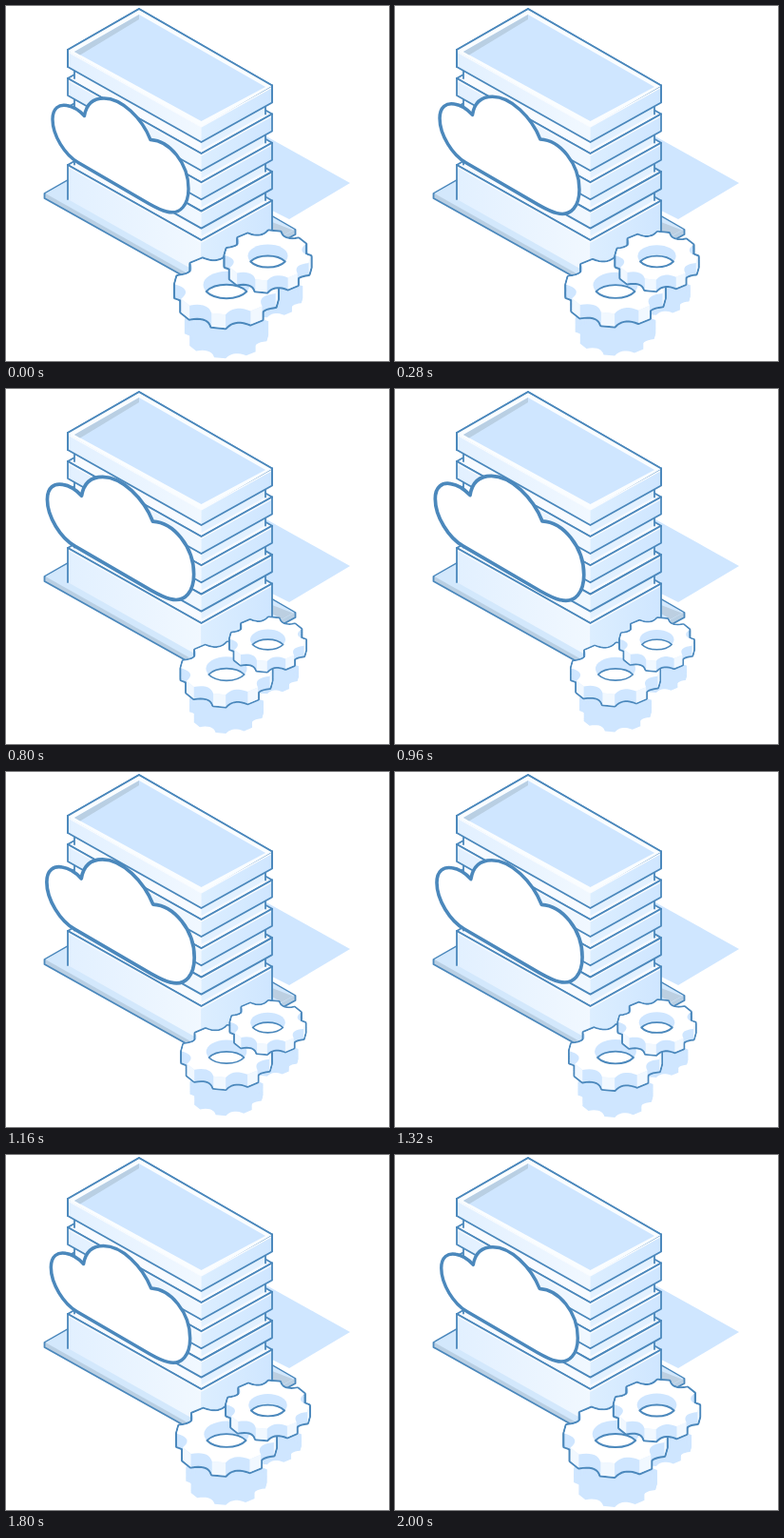
An HTML page for the animation above (2.04 s loop, 403 by 373 pixels).

```html
<!DOCTYPE html>
<html lang="en">
<head>
<meta charset="utf-8">
<title>Cloud server</title>
<style>
  html, body { margin: 0; width: 100%; height: 100%; overflow: hidden; background: #fff; }
  svg { display: block; width: 403px; height: 373px; }
</style>
</head>
<body>
<svg id="stage" viewBox="0 0 403 373" stroke-linejoin="round" stroke-linecap="round">
  <defs>
    <linearGradient id="leftFace"><stop stop-color="#e2f0ff"/><stop offset="1" stop-color="#f1f8ff"/></linearGradient>
    <linearGradient id="rightFace"><stop stop-color="#dceeff"/><stop offset="1" stop-color="#cfe6ff"/></linearGradient>
  </defs>
  <g id="building"></g>
  <g id="cloud">
    <path fill="#fff" stroke="#4b88bc" stroke-width="3.4" d="M82.500 115.500C84.500 103 92 97 103 97C122 97 143 118 152 140.500C172 141.500 192 165 192 192C192 208 184 220 169 216C164 215 158 212 150 207.500L76 164.500C62 156.500 49 136 49 119C49 107 56 103 64 104.500C71 105.500 77 109.500 82.500 115.500Z"/>
  </g>
  <g id="shadows"></g>
  <g id="gears"></g>
</svg>
<script>
const LINE = '#4b88bc', BLUE = '#cfe6ff', PERIOD = 2040, STEP = 40;
const $ = id => document.getElementById(id);

function add(parent, tag, attrs) {
  const node = document.createElementNS('http://www.w3.org/2000/svg', tag);
  for (const key in attrs) node.setAttribute(key, attrs[key]);
  return parent.appendChild(node);
}
const shape = (parent, d, fill, stroke = 'none', width = 1.8) =>
  add(parent, 'path', { d, fill, stroke, 'stroke-width': width });

// Two visible faces of an isometric block; y is the height of its left top corner.
function faces(y, height, inset, leftFill, rightFill) {
  const g = $('building');
  const left = 65 + inset, right = 280 - inset;
  const front = y + 79 - inset * 0.56, rightY = y + 37.5;
  shape(g, `M${left} ${y}L205.500 ${front}v${height}L${left} ${y + height}Z`, leftFill);
  shape(g, `M205.500 ${front}L${right} ${rightY}v${height}L205.500 ${front + height}Z`, rightFill);
  return { left, right, front, rightY };
}

function slab(y, height, closed = true) {
  const g = $('building');
  shape(g, `M65 ${y}L140 ${y - 43}L280 ${y + 37.5}L205.500 ${y + 79}Z`, '#f8fbff', LINE);
  const { front, rightY } = faces(y, height, 0, 'url(#leftFace)', 'url(#rightFace)');
  shape(g, `M65 ${y + 1.7}L205.500 ${front + 1.7}L280 ${rightY + 1.7}`, 'none', '#f8fbff', 1.6);
  const bottom = closed ? `L205.500 ${front + height}L280 ${rightY + height}` : `M280 ${rightY + height}`;
  shape(g, `M65 ${y}v${height}${bottom}V${rightY}`, 'none', LINE);
  shape(g, `M65 ${y}L205.500 ${front}L280 ${rightY}`, 'none', LINE);
}

function neck(y) {
  const height = 13;
  const { left, right, rightY } = faces(y, height, 7, '#f8fbff', '#e3f1ff');
  shape($('building'), `M${left} ${y}v${height}M${right} ${rightY}v${height}`, 'none', LINE);
}

function buildBuilding() {
  const g = $('building');
  shape(g, 'M274 137L362 186L298 224L274 212Z', BLUE);
  shape(g, 'M40.500 197L140 140L304.500 235v5L205 294L40.500 202Z', '#b9cfe3', LINE);
  shape(g, 'M41.500 197L140 141L303.500 235L205 289Z', '#d3e8fc');
  shape(g, 'M280 227L302 235.500L290 242L280 236Z', '#bccfe1');
  slab(167, 36, false);
  for (const y of [136.600, 106.300, 76]) {
    neck(y + 17);
    slab(y, 18);
  }
  neck(63);
  slab(46, 18);
  shape(g, 'M65.900 45.500L140 4L279.100 83L279.100 84.500L205.500 127L65.900 48Z', '#fafdff');
  shape(g, 'M72 48L140 9L273 85L205.500 121Z', BLUE);
  shape(g, 'M72 48L140 9V14L78 51.500Z', '#b9cfe3');
  shape(g, 'M65 64V46L140 3L280 83.500V101', 'none', LINE);
}

// Points around a cog with eight flat teeth and concave gaps, seen isometrically.
function cogPoints(r) {
  const points = [], at = (deg, k) => {
    const a = deg * Math.PI / 180;
    return [Math.cos(a) * r * k, Math.sin(a) * r * k * 0.577];
  };
  for (let tooth = 0; tooth < 8; tooth++) {
    const mid = tooth * 45 + 9;
    points.push(at(mid - 8, 1));
    const a = at(mid + 8, 1), c = at(mid + 22.5, 0.68), b = at(mid + 37, 1);
    for (let i = 0; i < 10; i++) {
      const t = i / 9, u = 1 - t;
      points.push([0, 1].map(k => u * u * a[k] + 2 * u * t * c[k] + t * t * b[k]));
    }
  }
  return points;
}
const outline = (points, dy = 0) =>
  'M' + points.map(([x, y]) => `${x.toFixed(2)} ${(y + dy).toFixed(2)}`).join('L') + 'Z';

function sweep(parent, points, depth, fill, stroke) {
  for (let dy = 0; dy <= depth; dy++) shape(parent, outline(points, dy), fill, stroke, 4);
}

function buildGear(x, y, r, depth, hole) {
  const shadow = add($('shadows'), 'g', {}), gear = add($('gears'), 'g', {});
  const points = cogPoints(r), top = -depth / 2;

  const cast = add(shadow, 'g', { transform: `translate(0 ${r * 0.7 - depth / 2})` });
  sweep(cast, cogPoints(r * 0.82), depth, BLUE, 'none');

  const body = add(gear, 'g', { transform: `translate(0 ${top})` });
  sweep(body, points, depth, LINE, LINE);
  sweep(body, points, depth, BLUE, 'none');
  points.forEach((a, i) => {
    const b = points[(i + 1) % points.length];
    if (i % 11 === 0 && b[0] < a[0])
      shape(body, `M${a}L${b}v${depth}L${a[0]} ${a[1] + depth}Z`, '#f1f8ff');
  });
  shape(body, outline(points), '#fff');

  const ry = hole * 0.577, half = hole * Math.sqrt(1 - (depth / 2 / ry) ** 2);
  add(gear, 'ellipse', { cy: top, rx: hole, ry, fill: BLUE });
  shape(gear, `M${-half} 0A${hole} ${ry} 0 0 1 ${half} 0A${hole} ${ry} 0 0 1 ${-half} 0Z`, '#fff', LINE, 2);

  return scale => [shadow, gear].forEach(node =>
    node.setAttribute('transform', `translate(${x} ${y}) scale(${scale})`));
}

buildBuilding();
const gears = [buildGear(232, 300, 54, 14, 24.5), buildGear(275.500, 268.500, 45, 12, 21)];

function render(time) {
  const t = Math.floor(time % PERIOD / STEP) * STEP;
  const phase = 1 - Math.abs(1 - 2 * t / PERIOD);
  gears.forEach(setScale => setScale(1 - 0.15 * phase));
  $('cloud').setAttribute('transform', `translate(120 157) scale(${1 + 0.1 * phase}) translate(-120 -157)`);
}

const start = performance.now();
function tick() {
  render(performance.now() - start);
  requestAnimationFrame(tick);
}
tick();
</script>
</body>
</html>
```
